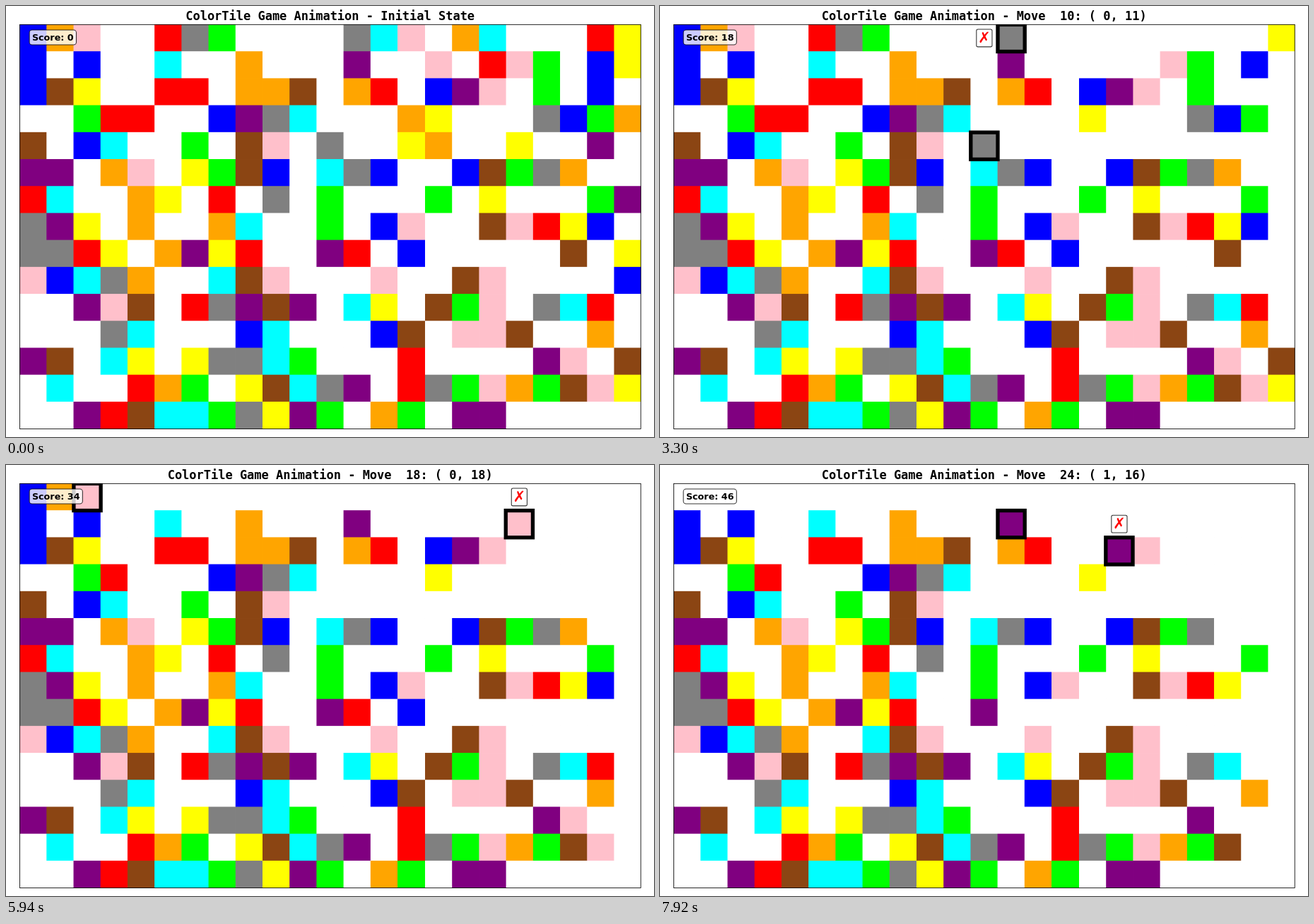
Recreate the animation shown at these times as an HTML page with a canvas. Size 917x611 px, loop 8 s.

```html
<!DOCTYPE html>
<html lang="en">
<head>
<meta charset="utf-8">
<title>ColorTile Game Animation</title>
<style>
  html, body { margin: 0; width: 100%; height: 100%; overflow: hidden; background: #fff; }
  canvas { display: block; }
</style>
</head>
<body>
<canvas id="stage" width="917" height="611"></canvas>
<script>
const ctx = document.getElementById('stage').getContext('2d');
const LOOP = 8000, STEP = 330;

// Everything is laid out on a 1200 x 800 figure scaled down to the stage
const SCALE = 917 / 1200;
const LEFT = 25, TOP = 34, CELL = 50;
const TILE = 50.035; // tiles spread slightly so that they fill the frame

const COLORS = {
  B: '#0000ff', O: '#ffa500', P: '#ffc0cb', R: '#ff0000', G: '#808080',
  L: '#00ff00', Y: '#ffff00', U: '#800080', N: '#8b4513', C: '#00ffff',
  '.': '#ffffff'
};

const START = [
  'BOP..RGL....GCP.OC...RY',
  'B.B..C..O...U..P.RPL.BY',
  'BNY..RR.OON.OR.BUP.L.B.',
  '..LRR..BUGC...OY...GBLO',
  'N.BC..L.NP.G..YO..Y..U.',
  'UU.OP.YLNB.CGB..BNLGO..',
  'RC..OY.R.G.L...L.Y...LU',
  'GUY.O..OC..L.BP..NPRYB.',
  'GGRY.OUYR..UR.B.....N.Y',
  'PBCGO..CNP...P..NP....B',
  '..UPN.RGUNU.CY.NLP.GCR.',
  '...GC...BC...BN.PPN..O.',
  'UN.CY.YGGCL...R....UP.N',
  '.C..ROL.YNCGU.RGLPOLNPY',
  '..URNCCLGYUL.OL.UU.....'
].map(row => [...row]);

// Clicked cells as [row, column]
const MOVES = [
  [4, 22], [0, 15], [4, 22], [0, 14], [4, 22], [0, 16], [2, 22], [0, 17],
  [4, 22], [0, 11], [8, 22], [0, 19], [1, 22], [0, 4], [2, 21], [0, 19],
  [3, 21], [0, 18], [8, 21], [0, 20], [8, 21], [0, 15], [12, 21], [1, 16]
];

// Nearest tiles in the four directions that share a colour
function findMatches(grid, [row, col]) {
  const seen = [];
  for (const [dr, dc] of [[-1, 0], [1, 0], [0, -1], [0, 1]]) {
    let r = row + dr, c = col + dc;
    while (grid[r]?.[c] === '.') { r += dr; c += dc; }
    if (grid[r]?.[c]) seen.push({ r, c, color: grid[r][c] });
  }
  return seen.filter(a => seen.some(b => a !== b && a.color === b.color));
}

function playGame() {
  const states = [{ grid: START, matches: [], score: 0, label: 'Initial State' }];
  let grid = START, score = 0;
  MOVES.forEach((click, i) => {
    const matches = findMatches(grid, click);
    const pad = (n, width) => String(n).padStart(width);
    const label = `Move ${pad(i + 1, 3)}: (${pad(click[0], 2)}, ${pad(click[1], 2)})`;
    states.push({ grid, matches, score, label, click });
    grid = grid.map(row => [...row]);
    matches.forEach(({ r, c }) => { grid[r][c] = '.'; });
    score += matches.length;
  });
  return states;
}

const states = playGame();
const colX = c => LEFT + 0.5 + c * CELL;
const rowY = r => TOP + 0.5 + r * CELL;

function drawText(text, x, y, font, color, align) {
  ctx.font = font;
  ctx.fillStyle = color;
  ctx.textAlign = align;
  ctx.fillText(text, x, y);
}

function drawBox(x, y, w, h, radius) {
  ctx.beginPath();
  ctx.roundRect(x, y, w, h, radius);
  ctx.globalAlpha = 0.8;
  ctx.fillStyle = '#fff';
  ctx.fill();
  ctx.lineWidth = 1.4;
  ctx.stroke();
  ctx.globalAlpha = 1;
}

// Additive drawing on black blends neighbouring tiles without seams
function drawTiles(grid) {
  ctx.fillStyle = '#000';
  ctx.fillRect(LEFT, TOP, 1151, 751);
  ctx.globalCompositeOperation = 'lighter';
  const edge = i => Math.round(i * TILE);
  grid.forEach((row, r) => row.forEach((key, c) => {
    ctx.fillStyle = COLORS[key];
    ctx.fillRect(LEFT + edge(c), TOP + edge(r), edge(c + 1) - edge(c), edge(r + 1) - edge(r));
  }));
  ctx.globalCompositeOperation = 'source-over';
}

function drawHighlights(matches) {
  ctx.save();
  ctx.beginPath();
  ctx.rect(LEFT, TOP, 1151, 751);
  ctx.clip();
  ctx.lineWidth = 7;
  matches.forEach(({ r, c }) => ctx.strokeRect(colX(c), rowY(r), CELL, CELL));
  ctx.restore();
}

function drawMark([row, col]) {
  const x = colX(col + 0.5), y = rowY(row + 0.5);
  drawBox(x - 14.5, y - 16.2, 29, 32.4, 2.8);
  drawText('✗', x, y + 8.5, 'bold 27.78px "DejaVu Sans", sans-serif', '#f00', 'center');
}

function drawScore(score) {
  const text = 'Score: ' + score;
  const font = 'bold 16.67px "DejaVu Sans", sans-serif';
  ctx.font = font;
  drawBox(43.3, 44.5, ctx.measureText(text).width + 10, 27.5, 5);
  drawText(text, 48.3, 63.5, font, '#000', 'left');
}

function draw({ grid, matches, score, label, click }) {
  ctx.setTransform(SCALE, 0, 0, SCALE, 0, 0);
  ctx.fillStyle = '#fff';
  ctx.fillRect(0, 0, 1200, 800);
  ctx.strokeStyle = '#000';
  drawTiles(grid);
  drawHighlights(matches);
  ctx.lineWidth = 1.1;
  ctx.strokeRect(colX(0), rowY(0), 23 * CELL, 15 * CELL);
  if (click) drawMark(click);
  drawScore(score);
  drawText('ColorTile Game Animation - ' + label, 600.2, 26,
    'bold 22.22px "DejaVu Sans Mono", monospace', '#000', 'center');
}

function tick() {
  draw(states[Math.floor(performance.now() % LOOP / STEP)]);
  requestAnimationFrame(tick);
}
tick();
</script>
</body>
</html>
```
